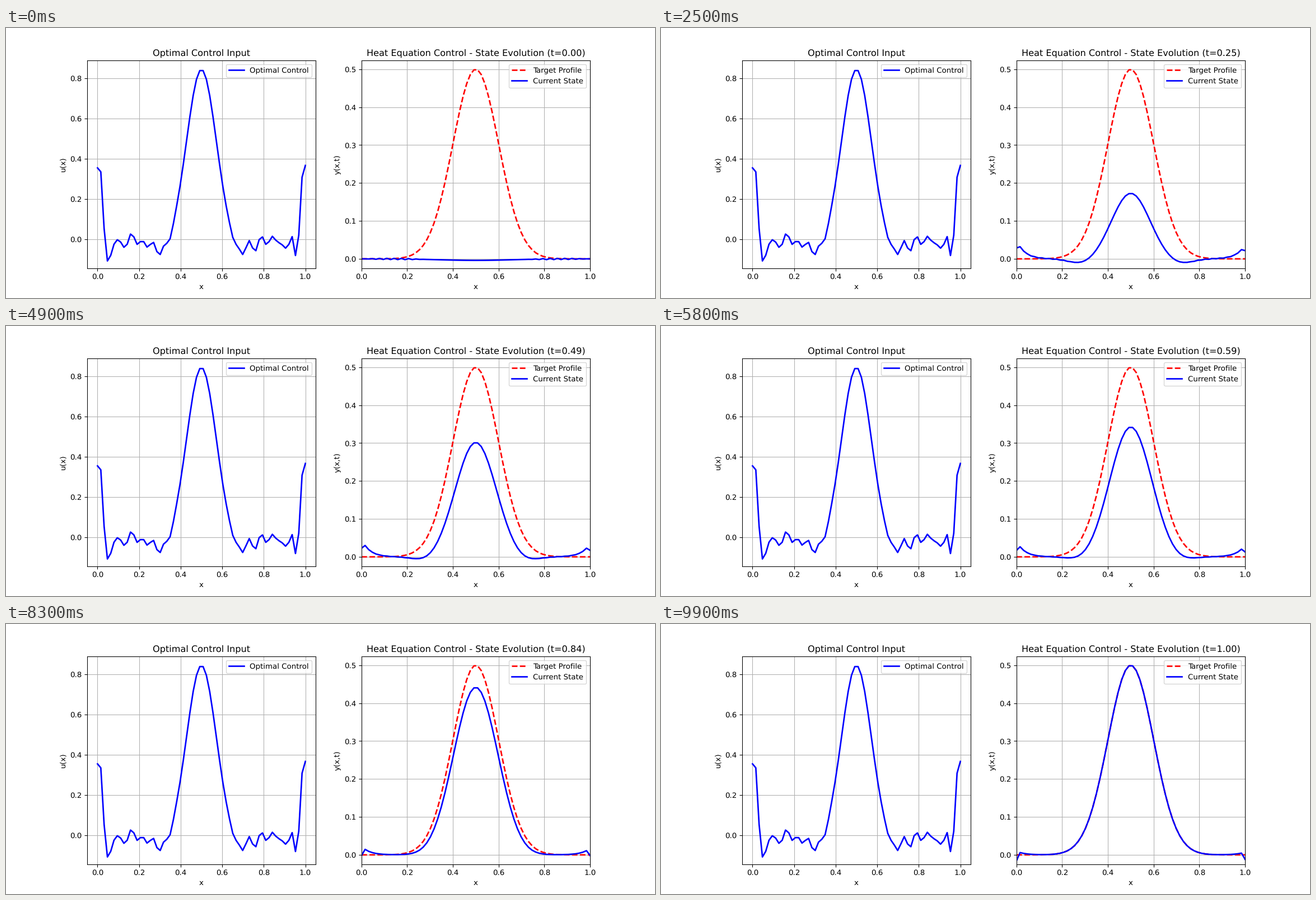
Write a matplotlib script that moves like this. It is 1159 by 483 pixels and loops after 10 s.

```python
import matplotlib.pyplot as plt
import numpy as np
from matplotlib.animation import FuncAnimation

N = 64
FRAMES = 100
DPI = 96
SCALE = 1159 / 12 / DPI  # a 12 x 5 inch layout on the pixel stage

plt.rcParams.update({
    "font.family": "DejaVu Sans",
    "font.size": 10 * SCALE,
    "lines.linewidth": 2 * SCALE,
    "text.hinting": "none",
})

x = np.linspace(0, 1, N)
node = np.arange(N)
edge = np.minimum(node, N - 1 - node)  # nodes to the nearest boundary
dist = np.abs(x - 0.5)
half = np.sign(0.5 - x)  # +1 on the left, -1 on the right


def bell(value, center, width, power=2):
    return np.exp(-np.abs((value - center) / width) ** power)


def gauss(sigma):
    return np.exp(-dist**2 / (2 * sigma**2))


def control():
    """Central pulse, boundary spikes and a decaying oscillation between."""
    pulse = 0.87 * gauss(0.07) - 0.06 * bell(edge, 20.5, 3) - 0.025
    spikes = 0.386 * bell(edge, 0, 1.75, 4) - 0.07 * bell(edge, 3, 0.7)
    swell = 0.03 * bell(edge, 10.8, 2)
    wave = 0.025 * np.cos(2 * np.pi * (edge - 10) / 3.5) * bell(edge, 15, 7, 4)
    skew = 0.012 * np.cos(2 * np.pi * (edge - 15.5) / 4.67) * bell(edge, 0, 22, 8)
    skew *= 1 + 3 * bell(edge, 4, 1.5, 1)
    return pulse + spikes + swell + wave + half * skew


def state(t):
    """Growing, widening bump with shallow dips and boundary layers."""
    rest = 1 - t
    height = 0.5 * t * (1 + (0.66 - 0.31 * t) * rest)
    bump = height * gauss(0.0755 + 0.0245 * t)

    sag = (0.004 + 0.028 * t) * rest * bell(dist, 0, 0.1 + 0.12 * np.exp(-10 * t))
    dips = 0.036 * np.sqrt(t) * rest * bell(dist, 0.21, 0.08)

    layer = 0.06 * rest * (1 - np.exp(-4.5 * t)) + 0.006 * t
    walls = layer * np.exp((1 - edge) / 2.2)
    walls -= 0.025 * (1 - np.exp(-8 * t)) * (edge == 0)
    walls *= np.where(half > 0, 1, 0.76)

    ripple = 0.0016 * (-1.0) ** edge * bell(edge, 9, 6, 4) * np.exp(-3.5 * t)
    return bump - sag - dips + walls - ripple


fig, (left, right) = plt.subplots(1, 2, figsize=(1159 / DPI, 483 / DPI), dpi=DPI)

left.plot(x, control(), "b-", label="Optimal Control")
left.set(title="Optimal Control Input", xlabel="x", ylabel="u(x)",
         ylim=(-0.1451, 0.8901))

right.plot(x, 0.5 * gauss(0.1), "r--", label="Target Profile")
(line,) = right.plot(x, state(0), "b-", label="Current State")
right.set(xlabel="x", ylabel="y(x,t)", xlim=(0, 1), ylim=(-0.0249, 0.5233))

for ax in (left, right):
    ax.grid(True)
    ax.legend(loc="upper right")


def update(i):
    t = i / (FRAMES - 1)
    line.set_ydata(state(t))
    right.set_title(f"Heat Equation Control - State Evolution (t={t:.2f})")
    return (line,)


anim = FuncAnimation(fig, update, frames=FRAMES, interval=100, repeat=True)
plt.show()
```
